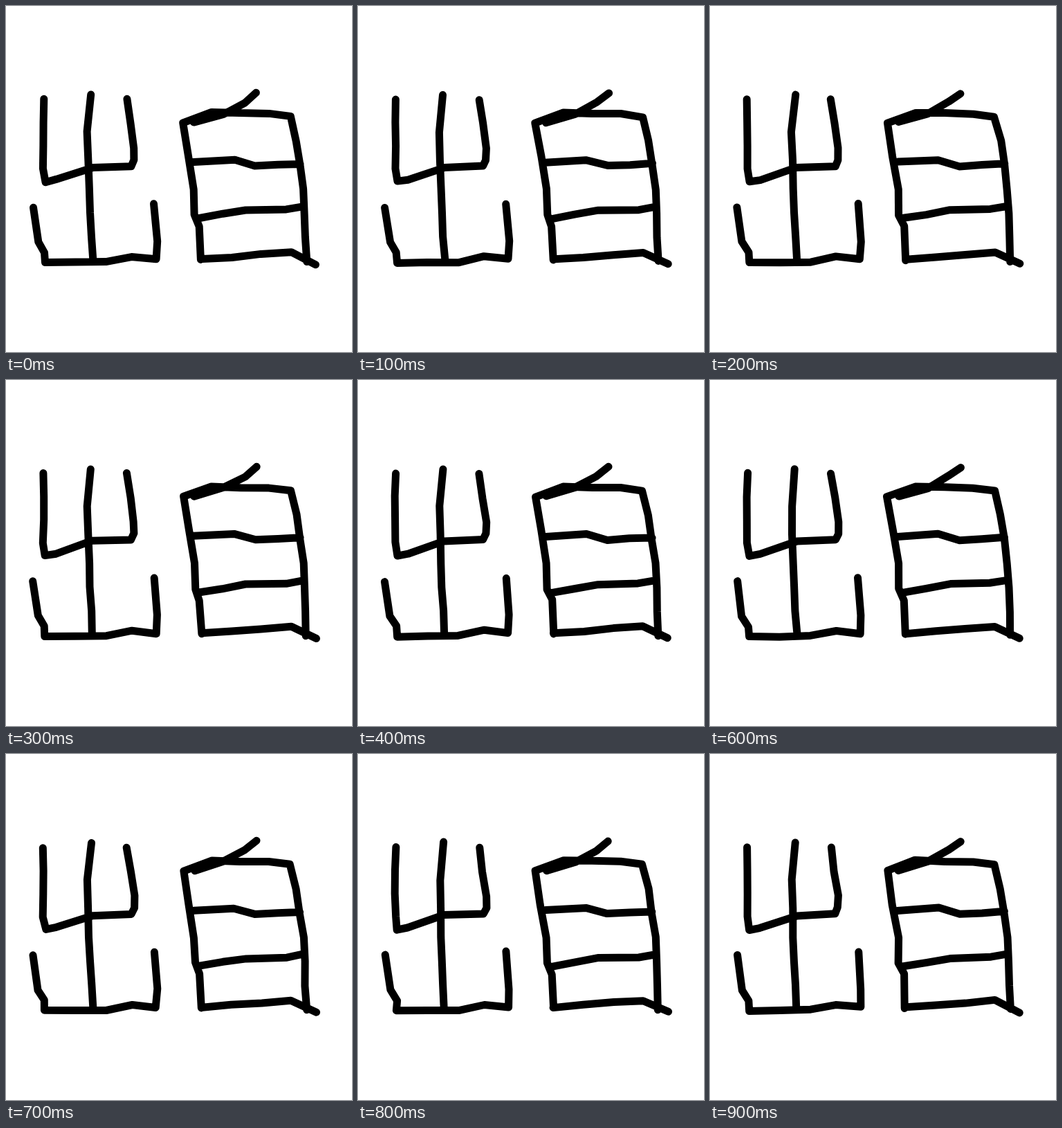
Animation of 500x500 px, one loop 1 s. Source, as an HTML page:

```html
<!DOCTYPE html>
<html lang="en">
<head>
<meta charset="utf-8">
<title>Wobbling strokes</title>
<style>
html, body { margin: 0; width: 100%; height: 100%; overflow: hidden; background: #fff; }
svg { display: block; width: 100%; height: 100%; }
path { fill: none; stroke: #000; stroke-width: 11; stroke-linecap: round; stroke-linejoin: round; }
</style>
</head>
<body>
<svg viewBox="0 0 500 500"><path id="ink"/></svg>
<script>
const STEP = 100, POSES = 10, WOBBLE = 0.9, SPACING = 40;

// Key points of each pen stroke
const strokes = [
  // left character
  "54,135 54,235 57,254 72,251 125,233 181,231 185,222 185,205 175,135",
  "123,128 118,182 120,265 125,367",
  "39,291 46,341 56,356 56,371 145,370 182,362 217,366 218,340 214,286",
  // right character
  "282,367 280,318 273,302 272,265 256,169 297,154 380,156 411,160 420,195 430,265 434,369",
  "272,168 314,156 345,139 362,126",
  "271,226 330,223 360,231 425,228",
  "279,307 347,295 405,294 428,290",
  "283,366 412,356 448,373"
].map(s => subdivide(s.split(" ").map(p => p.split(",").map(Number))));

const ink = document.getElementById("ink");

// Adds evenly spaced points so that long segments also tremble
function subdivide(points) {
  return points.flatMap(([x, y], i) => {
    const [u, v] = points[i + 1] || [x, y];
    const parts = Math.max(1, Math.round(Math.hypot(u - x, v - y) / SPACING));
    return Array.from({ length: parts }, (_, k) =>
      [x + (u - x) * k / parts, y + (v - y) * k / parts]);
  });
}

function noise(n, pose) {
  const v = Math.sin(n * 12.9898 + pose * 78.233) * 43758.5453;
  return (v - Math.floor(v)) * 2 - 1;
}

function outline(pose) {
  let n = 1;
  const jitter = v => (v + WOBBLE * noise(n++, pose)).toFixed(1);
  return strokes.map(s => "M" + s.map(p => p.map(jitter)).join("L")).join("");
}

function draw() {
  const pose = Math.floor(performance.now() / STEP) % POSES;
  ink.setAttribute("d", outline(pose));
  requestAnimationFrame(draw);
}
draw();
</script>
</body>
</html>
```
